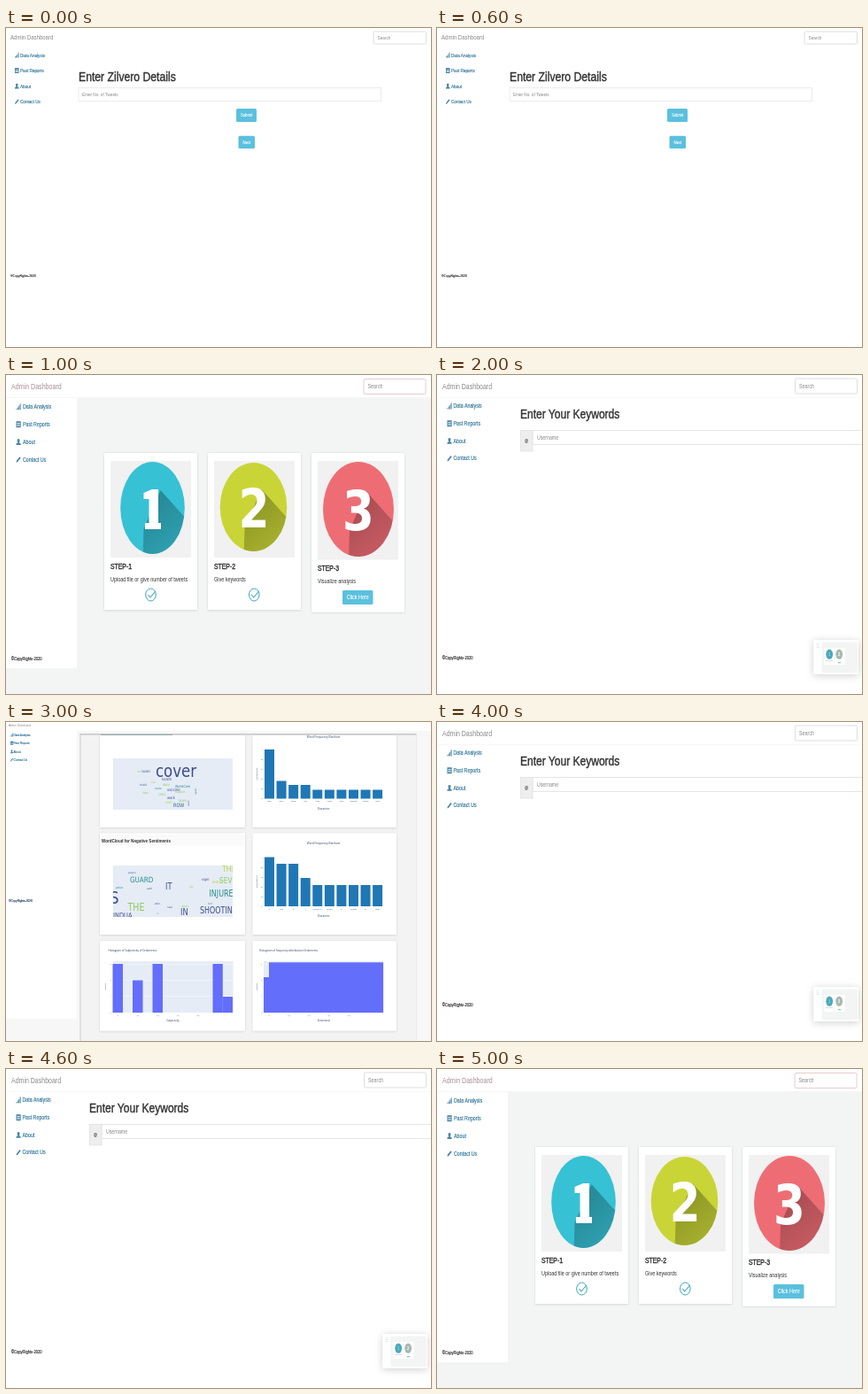
Animation, 480 px wide and 360 px high, one loop 6 s. Source, as an HTML page:

```html
<!DOCTYPE html>
<html lang="en">
<head>
<meta charset="utf-8">
<title>Admin Dashboard</title>
<style>
  html, body { margin: 0; width: 100%; height: 100%; overflow: hidden; background: #fff; }
  svg { display: block; }
  text { font-family: "Liberation Sans", Arial, sans-serif; }
  .firm { stroke: currentColor; stroke-width: .14px; }
  .medium { stroke: currentColor; stroke-width: .42px; }
  .bold { font-weight: bold; }
  .chart { font-family: "Open Sans", sans-serif; }
  .cloud { font-family: "DejaVu Sans", sans-serif; }
  .digit { font-family: "DejaVu Sans", sans-serif; font-weight: bold; }
</style>
</head>
<body>
<svg id="stage" width="100%" height="100%" viewBox="0 0 480 360"></svg>
<script>
const SQUEEZE = 0.83; // the wide screen is shown on a 4:3 stage
const LINK = '#2a7196', INFO = '#5bc0de', CHART_INK = '#2a3f5f', PLOT = '#e5ecf6';

// Shapes are given by their edges: left, top, right, bottom.
const box = (l, t, r, b, fill, extra = '') =>
  `<rect x="${l}" y="${t}" width="${r - l}" height="${b - t}" fill="${fill}" ${extra}/>`;
const oval = (cx, cy, rx, ry, fill, extra = '') =>
  `<ellipse cx="${cx}" cy="${cy}" rx="${rx}" ry="${ry}" fill="${fill}" ${extra}/>`;
const path = (d, fill, extra = '') => `<path d="${d}" fill="${fill}" ${extra}/>`;
const outline = (color, width = 0.8) => `stroke="${color}" stroke-width="${width}"`;

// y is the middle of the capitals.
function label(str, x, y, size, fill, { cls = '', anchor = 'start', turn = 0 } = {}) {
  return `<text class="${cls}" transform="translate(${x} ${y}) scale(${SQUEEZE} 1) rotate(${turn})"
    y="${size * 0.34}" font-size="${size}" fill="${fill}" color="${fill}" text-anchor="${anchor}">${str}</text>`;
}
const centred = (str, x, y, size, fill, cls = '') => label(str, x, y, size, fill, { cls, anchor: 'middle' });

const icons = [
  'M0 7V5.5H1V7ZM1.6 7V4H2.7V7ZM3.2 7V2.2H4.3V7ZM4.8 7V0H6V7Z',
  'M0 0H6V7H0ZM1 2V2.7H5V2ZM1 3.6V4.3H5V3.6ZM1 5.2V5.9H5V5.2Z',
  'M3 0C5.4 0 4.8 3.4 3.8 4.2L6 5.6V7H0V5.6L2.2 4.2C1.2 3.4 .6 0 3 0Z',
  'M0 7L.6 4.8L4.6 .3L6 1.6L2 6.2Z',
];
const pages = ['Data Analysis', 'Past Reports', 'About', 'Contact Us'];

function menu({ brand, iconX, textX, top, step, size, foot, brandInk = '#888', footInk = '#222' }) {
  const [bx, by, bsize] = brand, [fx, fy, fsize] = foot, k = size / 6.5;
  return label('Admin Dashboard', bx, by, bsize, brandInk)
    + pages.map((name, i) => {
      const y = top + i * step;
      return `<g transform="translate(${iconX} ${y - 3.6 * k}) scale(${k * 0.88} ${k})">${
        path(icons[i], LINK, 'fill-rule="evenodd" opacity=".85"')}</g>`
        + label(name, textX, y, size, LINK, { cls: 'firm' });
    }).join('')
    + label('©CopyRights-2020', fx, fy, fsize, footInk, { cls: 'firm' });
}
const search = (l, t, r, b, size, border) =>
  box(l, t, r, b, '#fff', `rx="1.5" ${outline(border)}`) + label('Search', l + 4.5, (t + b) / 2, size, '#888');
const button = (str, l, t, r, b, size) =>
  box(l, t, r, b, INFO, 'rx="1.5"') + centred(str, (l + r) / 2, (t + b) / 2, size, '#fff', 'firm');

function detailsPage() {
  return menu({ brand: [5, 11, 7.3], iconX: 10, textX: 16, top: 30.6, step: 17.5, size: 5.6, foot: [5, 279.8, 4.1] })
    + search(415, 4, 474.5, 18, 5.7, '#d6d6d6')
    + label('Enter Zilvero Details', 82, 55.2, 14.7, '#333', { cls: 'medium' })
    + box(82, 67.5, 423.5, 82.5, '#fff', outline('#e8e8e8'))
    + label('Enter No. of Tweets', 86, 75, 5.6, '#888')
    + button('Submit', 260, 91, 283, 106, 5.1)
    + button('Next', 262.5, 121.8, 281, 136, 5.1);
}

function stepCard(n, left, { color, cx, cy, rx, ry, drop = 0, caption, digit, bottom }) {
  const x = left + 7, clip = `disc${n}`;
  const shade = `M${cx + 9} ${cy - 20}l70 78h-90L${cx - 10} ${cy + 24}Z`;
  return box(left, 88, left + 105, 265 + drop, '#fff', 'filter="url(#soft)"')
    + box(x, 97, x + 91, 206 + drop, '#f1f1f1')
    + `<clipPath id="${clip}">${oval(cx, cy, rx, ry, '#000')}</clipPath>`
    + oval(cx, cy, rx, ry, color)
    + path(shade, 'url(#fade)', `clip-path="url(#${clip})"`)
    + digit
    + label(`STEP-${n}`, x, 216 + drop, 8.3, '#333', { cls: 'medium' })
    + label(caption, x, 231 + drop * 0.8, 6.6, '#333')
    + bottom;
}
const tick = x => oval(x, 248, 5.8, 7, 'none', outline('#3ba5c0', 1))
  + path(`M${x - 3} 248l2.4 3l6 -7`, 'none', outline('#3ba5c0', 1.1));

function stepsPage() {
  return box(0, 0, 480, 360, '#f3f5f5') + box(0, 0, 480, 26, '#fff') + box(0, 25.5, 80, 331, '#fff')
    + box(0, 25, 480, 25.6, '#f1f1f1')
    + menu({ brand: [6, 13, 8.55], iconX: 11.5, textX: 19, top: 36, step: 19.8, size: 6.4,
             foot: [6, 320.3, 4.95], brandInk: '#a58c92' })
    + search(404, 4.5, 474, 21.5, 6.5, '#e3bec5')
    + stepCard(1, 111, { color: '#37c1d5', cx: 165.5, cy: 150, rx: 36.3, ry: 52, bottom: tick(163.5),
        caption: 'Upload file or give number of tweets',
        digit: path('M155.5 133L165 129H172V167H175V174H157V167H161.5V140H155.5Z', '#fff') })
    + stepCard(2, 228, { color: '#c9d536', cx: 279.5, cy: 149, rx: 37.8, ry: 50, bottom: tick(280.3),
        caption: 'Give keywords', digit: centred('2', 280, 151.5, 60, '#fff', 'digit') })
    + stepCard(3, 345, { color: '#ee6d75', cx: 398, cy: 151.5, rx: 40, ry: 53.5, drop: 2.5,
        caption: 'Visualize analysis', digit: centred('3', 398, 154, 62, '#fff', 'digit'),
        bottom: button('Click Here', 380, 243, 414.5, 259, 6.5) });
}

function keywordsPage() {
  const line = '#e0e0e0';
  return box(0, 25, 480, 25.6, '#f4f4f4')
    + menu({ brand: [6, 13, 8.45], iconX: 11.5, textX: 18.5, top: 35.1, step: 19.7, size: 6.4, foot: [6, 319.5, 4.95] })
    + search(404.5, 4, 474.5, 21, 6.5, '#d6d6d6')
    + label('Enter Your Keywords', 94, 44.2, 14.5, '#333', { cls: 'medium' })
    + box(108, 62.5, 484, 78.5, '#fff', outline(line))
    + box(94.3, 62.5, 108, 86, '#eee', outline(line))
    + centred('@', 101, 74, 5, '#555', 'firm')
    + label('Username', 113, 71, 6.3, '#888')
    + box(425.5, 299, 476, 337.5, '#fff', 'filter="url(#lift)"')
    + box(434.5, 301.5, 475, 336, '#f3f5f5')
    + box(437.5, 308, 448.5, 327, '#fff') + box(449.5, 308, 460.5, 327, '#fff')
    + oval(443.2, 315.2, 3.9, 5.6, '#4ba9ba') + oval(454.2, 315.2, 3.9, 5.6, '#a9b8b0')
    + centred('1', 443.2, 315.2, 5, '#9fd0da', 'bold') + centred('2', 454.2, 315.2, 5, '#fff', 'bold')
    + box(439, 322.3, 447, 323, '#ccc') + box(453, 324, 456, 325.2, '#7cc4d4')
    + [303, 305, 307].map(y => box(428.5, y, 431.5, y + 0.6, '#c5dce4')).join('');
}

const chartText = (str, x, y, size = 2.9, opts = {}) =>
  label(str, x, y, size, CHART_INK, { cls: 'chart', anchor: 'middle', ...opts });

function barChart(titleY, base, tops, words) {
  const pitch = 13.57;
  return chartText('Word Frequency Barchart', 358.5, titleY, 3.8)
    + chartText('Frequency', 283.5, base - 28, 2.9, { turn: -90 })
    + chartText('Characters', 358.5, base + 11, 3.3)
    + tops.map((top, i) => box(292 + i * pitch, top, 303 + i * pitch, base, '#1f77b4')
      + chartText(words[i], 297.5 + i * pitch, base + 3, 2.3)).join('')
    + [0, 0.2, 0.4, 0.6, 0.8, 1].map((v, i) => chartText(v, 289, base - i * 11, 2.3)).join('');
}

function histogram(left, title, axis, bars) {
  return label(title, left - 5, 258, 3.6, CHART_INK, { cls: 'chart' })
    + box(left, 270, left + 136, 328, PLOT)
    + [0, 1, 2, 3].map(i => box(left, 273 + i * 18.3, left + 136, 273.4 + i * 18.3, '#fff')
      + chartText(3 - i, left - 2.5, 273 + i * 18.3, 2.3)).join('')
    + bars.map(([l, r, top]) => box(left + l, top, left + r, 328, '#636efa')).join('')
    + [0, 0.2, 0.4, 0.6, 0.8].map((v, i) => chartText(v, left + 6 + i * 22.6, 331, 2.3)).join('')
    + chartText('count', left - 8, 299, 2.9, { turn: -90 })
    + chartText(axis, left + 68, 336.5, 3.3);
}

// Words: text, left, middle, size, colour index, turn.
const viridis = ['#3f4c8a', '#33638d', '#2a8a8c', '#8fca5c', '#b8d84a'];
const wordCloud = (top, words) =>
  `<svg x="121" y="${top}" width="135" height="58" viewBox="121 ${top} 135 58">`
  + box(121, top, 256, top + 58, PLOT)
  + words.map(([str, x, y, size, c, turn]) => label(str, x, y, size, viridis[c], { cls: 'cloud', turn })).join('')
  + '</svg>';

const praise = [
  ['cover', 169, 55, 20, 0], ['SWABS', 153, 56, 3.4, 1], ['free', 148, 56.5, 2.8, 3], ['health', 176, 65, 4.3, 0],
  ['shield', 151, 71, 3.2, 1], ['trial', 164, 68, 3, 3], ['WorldCare', 191, 72.5, 4, 2], ['daily', 177, 71, 4, 3],
  ['vaccine', 182, 76, 4.6, 0], ['hope', 154, 80, 3.4, 3], ['made', 168, 75, 3.2, 2], ['support', 191, 79, 3.6, 3],
  ['clinic', 172, 82, 4, 3], ['work', 182, 86, 4.4, 0], ['team', 195, 89, 4.2, 3], ['staff', 180, 91, 4, 4],
  ['ROW', 189, 94, 6, 1], ['safe', 206, 95, 3, 0, -90], ['open', 214, 82, 3, 1, -90],
];
const alarm = [
  ['GUARD', 140, 178.5, 8.7, 2], ['IT', 180, 185.5, 10, 0], ['THE', 137.5, 209.5, 11.4, 3], ['IN', 197, 214.5, 10, 0],
  ['SHOOTING', 219, 212.5, 9.6, 0], ['INJURED', 229.5, 194, 9.6, 2], ['THE', 244, 165.5, 9.5, 4],
  ['SEVEN', 241, 178.5, 9, 3], ['S', 117, 198, 20, 0], ['INDUA', 121, 218, 8, 0], ['people', 138, 169.5, 3, 1],
  ['police', 124, 187, 3.4, 2], ['said', 159, 188, 3.2, 0], ['after', 168, 205, 3, 0], ['near', 182, 208.5, 3.2, 1],
  ['night', 221, 177.5, 4, 0], ['were', 233, 180, 5, 4], ['city', 207, 186, 3, 3], ['reports', 198, 208, 3, 3],
  ['hurt', 228, 205, 3, 2], ['at', 170, 216, 3, 3],
];

function chartsPage() {
  const cards = [[15, 119], [125.5, 240], [247, 348.5]];
  return box(80, 10, 480, 360, '#f7f7f7') + box(0, 335, 84, 360, '#f7f7f7')
    + box(84, 14, 463, 360, '#f3f3f3')
    + cards.map(([t, b]) => box(106, t, 270, b, '#fff', 'filter="url(#soft)"')
      + box(278.5, t, 441, b, '#fff', 'filter="url(#soft)"')).join('')
    + box(83.5, 13.5, 84.5, 360, '#ccc') + box(463, 14, 463.6, 360, '#e2e2e2')
    + box(83.5, 13.3, 463.5, 14.5, '#bbb') + box(107, 14, 188, 15, '#8fa9a9')
    + menu({ brand: [3, 4, 3.75], iconX: 5, textX: 8.5, top: 14.5, step: 9.4, size: 3.8,
             foot: [3, 202, 3.8], footInk: '#17375e' })
    + wordCloud(41, praise) + wordCloud(162, alarm)
    + box(107, 127, 269, 139.5, '#fafafa')
    + label('WordCloud for Negative Sentiments', 108, 134, 5.5, '#333', { cls: 'bold' })
    + barChart(16.5, 86.5, [31, 66.5, 71, 71, ...Array(6).fill(76.5)],
        ['cover', 'work', 'SWAB', 'free', 'hope', 'made', 'team', 'shielding', 'vaccine', 'open'])
    + barChart(137, 208, [152.5, 160, 160, 176, ...Array(6).fill(184)],
        ['IT', 'THE', 'IN', 'S', 'SHOOTING', 'GUARD', 'IT', 'INJURED', 'AT', 'SEVEN'])
    + histogram(120.5, 'Histogram of Subjectivity of Sentiments', 'Subjectivity',
        [[0, 11.5, 273], [22.5, 34, 291.5], [45, 56.5, 273], [113, 124.3, 273], [124.3, 135.5, 310]])
    + histogram(291, 'Histogram of frequency distribution Sentiments', 'Sentiments',
        [[0, 6, 288], [6, 135, 271.3]]);
}

const stage = document.getElementById('stage');
const scenes = [detailsPage, stepsPage, keywordsPage, chartsPage];
stage.innerHTML = `<defs>
  <filter id="soft" x="-10%" y="-10%" width="120%" height="120%">
    <feDropShadow dx="0" dy=".5" stdDeviation="1.2" flood-opacity=".16"/></filter>
  <filter id="lift" x="-40%" y="-50%" width="180%" height="200%">
    <feDropShadow dx="0" dy="1.5" stdDeviation="4" flood-opacity=".2"/></filter>
  <linearGradient id="fade" x2="1" y2="1">
    <stop offset=".2" stop-opacity=".28"/><stop offset=".8" stop-opacity=".12"/></linearGradient>
  </defs>` + scenes.map(draw => `<g class="scene">${draw()}</g>`).join('');

const layers = stage.querySelectorAll('.scene');
const order = [0, 1, 2, 3, 2, 1];

function show() {
  const current = order[Math.floor(performance.now() / 1000) % order.length];
  layers.forEach((layer, i) => { layer.style.display = i === current ? '' : 'none'; });
  requestAnimationFrame(show);
}
show();
</script>
</body>
</html>
```
